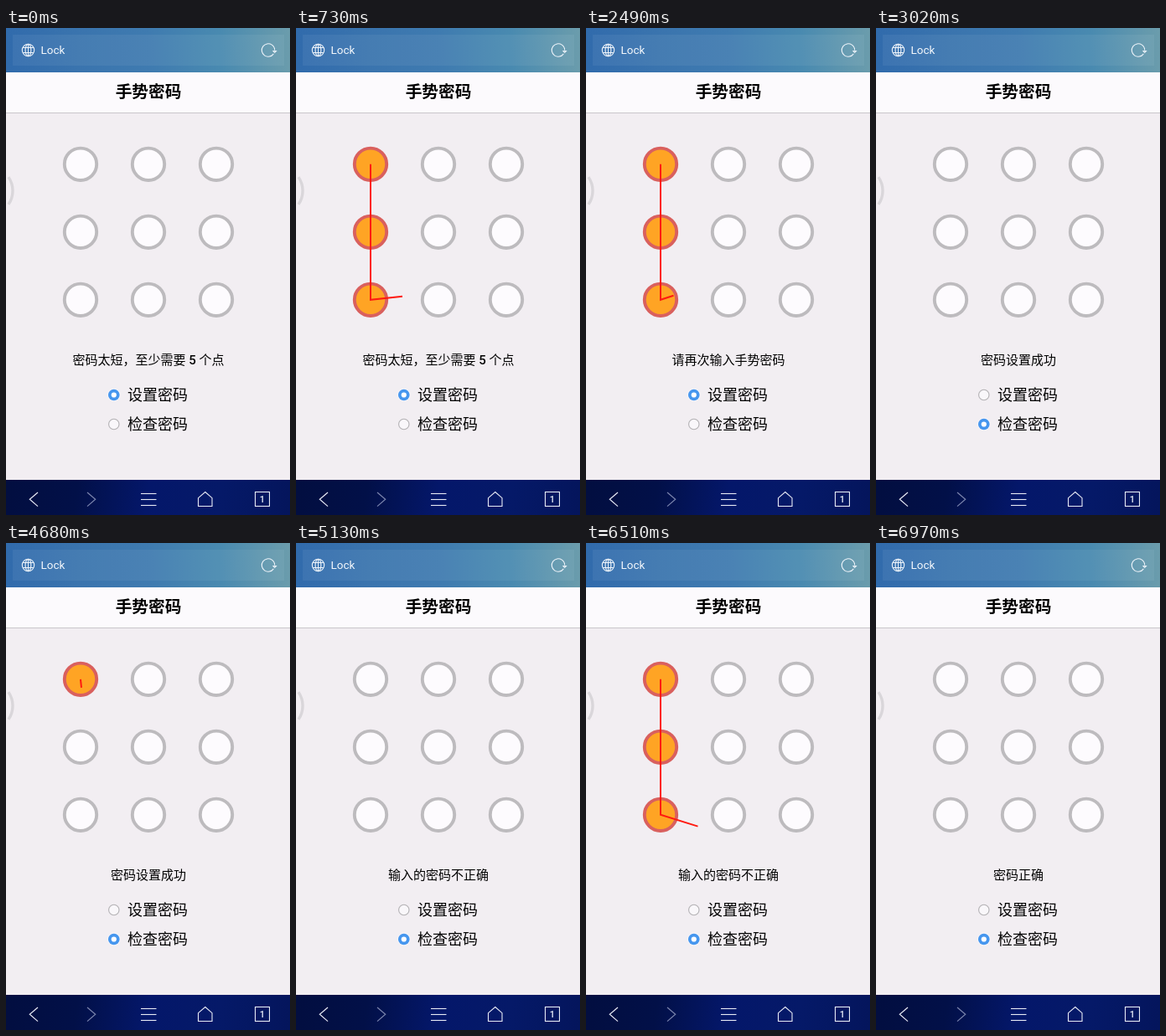
An HTML page with a canvas for the animation above (8 s loop, 339 by 582 pixels).

```html
<!DOCTYPE html>
<html lang="zh-CN">
<head>
<meta charset="utf-8">
<title>手势密码</title>
<style>
  html, body { margin: 0; width: 100%; height: 100%; overflow: hidden; background: #f2eef2; }
  canvas { display: block; }
</style>
</head>
<body>
<canvas id="stage" width="339" height="582"></canvas>
<script>
const ctx = document.getElementById('stage').getContext('2d');
const W = 339, H = 582, LOOP = 8000;
const CJK = '"Noto Sans CJK SC", "Noto Sans CJK", sans-serif';
const LATIN = 'Roboto, sans-serif';
const { PI, sin, cos, floor, min } = Math;

// Dot grid
const LEFT = 89, TOP = 162.8, GAP = 81, REACH = 30;
const CORNER = 2 * GAP;

const linear = v => v;
const easeOut = v => sin(v * PI / 2);
const easeInOut = v => (1 - cos(v * PI)) / 2;

// Every swipe runs down the left column, then right along the bottom row.
// near and far bound the rightward leg; drift is the finger's offset from the row.
const swipes = [
  { start: 460, end: 1120, steps: 5, near: 38, far: 188, ease: linear, drift: () => -4,
    reply: '请再次输入手势密码' },
  { start: 2240, end: 3020, steps: 6, near: 15.5, far: 175, ease: easeOut, drift: () => -5,
    reply: '密码设置成功' },
  { start: 4680, end: 5130, steps: 3, near: 3, far: 3, ease: linear, drift: () => 4,
    reply: '输入的密码不正确' },
  { start: 6100, end: 6970, steps: 6, near: 0, far: 178, ease: easeInOut,
    drift: v => 24 * sin(2 * PI * v) * (1 - v), reply: '密码正确' }
];

function fingerAt(swipe, t) {
  const { start, end, steps, near, far, ease, drift } = swipe;
  // The touch is seen in steps; the small lead makes each one land a little early.
  const step = min(steps - 1, floor((t - start) / (end - start) * steps + 0.18));
  if (step < 2) {
    const down = 10 + 112 * step;
    return { x: LEFT + 1, y: TOP + down, travelled: down };
  }
  const v = (step - 2) / Math.max(1, steps - 3);
  const right = near + (far - near) * ease(v);
  return { x: LEFT + right, y: TOP + CORNER + drift(v), travelled: CORNER + right };
}

function stroke(points, color, width = 1, close = false) {
  ctx.beginPath();
  points.forEach(([x, y]) => ctx.lineTo(x, y));
  if (close) ctx.closePath();
  ctx.strokeStyle = color;
  ctx.lineWidth = width;
  ctx.stroke();
}

function arc(x, y, r, from, to, color, width) {
  ctx.beginPath();
  ctx.arc(x, y, r, from, to);
  ctx.strokeStyle = color;
  ctx.lineWidth = width;
  ctx.stroke();
}

function circle(x, y, r, fill, line, width) {
  ctx.beginPath();
  ctx.arc(x, y, r, 0, 2 * PI);
  ctx.fillStyle = fill;
  ctx.fill();
  if (line) arc(x, y, r, 0, 2 * PI, line, width);
}

function text(str, x, y, font, color = '#000', align = 'left') {
  ctx.font = font;
  ctx.textAlign = align;
  ctx.fillStyle = color;
  ctx.fillText(str, x, y);
}

function gradientBand(y, height, slope, colors) {
  const g = ctx.createLinearGradient(0, y, W, y + slope);
  colors.forEach((c, i) => g.addColorStop(i / (colors.length - 1), c));
  ctx.fillStyle = g;
  ctx.fillRect(0, y, W, height);
}

function drawAddressBar() {
  gradientBand(0, 53, -20, ['#316bac', '#3a74ae', '#3f7bb0', '#498ab0', '#6c9dac']);
  ctx.fillStyle = 'rgba(255,255,255,.055)';
  ctx.fillRect(8, 8, 324, 37);

  const white = '#eef4fa';
  const cx = 26.5, cy = 26.5, r = 7.2;
  arc(cx, cy, r, 0, 2 * PI, white, 1.1);
  ctx.beginPath();
  ctx.ellipse(cx, cy, 3.4, r, 0, 0, 2 * PI);
  ctx.stroke();
  stroke([[cx, cy - r], [cx, cy + r]], white);
  for (const dy of [-3, 3]) stroke([[cx - 6.4, cy + dy], [cx + 6.4, cy + dy]], white);
  text('Lock', 41.5, 31, '13.5px ' + LATIN, '#f4f8fc');

  arc(313, cy, 7.7, 0.6, 2 * PI, white, 1.1);
  stroke([[319, 27.5], [322.5, 27.5], [320.7, 29.5]], white, 1.1, true);
}

function drawTitle() {
  ctx.fillStyle = '#fcfafd';
  ctx.fillRect(0, 53, W, 48);
  ctx.fillStyle = '#c8c6ca';
  ctx.fillRect(0, 101, W, 1);
  text('手势密码', W / 2 + 0.5, 83, 'bold 19.7px ' + CJK, '#000', 'center');
}

function drawToolbar() {
  const top = 540, mid = 563.3, white = '#e8ebf5';
  gradientBand(top, H - top, 42, ['#020e40', '#021048', '#04176a', '#051968', '#04155c']);
  const chevron = (x, dx, color) =>
    stroke([[x, mid - 8.3], [x + dx, mid], [x, mid + 8.3]], color, 1.2);
  chevron(38, -9.7, white);
  chevron(97, 9.7, '#7c86ae');
  for (const dy of [-7, 0, 7]) stroke([[161, 563.5 + dy], [179.5, 563.5 + dy]], white, 1.1);
  stroke([[237.8, 554.5], [246, 561.7], [246, 571.5], [229.5, 571.5], [229.5, 561.7]], white, 1.1, true);
  ctx.strokeRect(297.5, 554.5, 17, 17);
  text('1', 306, 567, '500 11px ' + LATIN, white, 'center');
}

function drawRadio(y, label, on) {
  const x = 128.8;
  if (on) {
    circle(x, y, 7.8, '#f8f6fa');
    circle(x, y, 6.8, '#4696ee');
    circle(x, y, 3.1, '#fff');
  } else {
    circle(x, y, 6.2, '#f9f7fa', '#b3b1b4', 1.1);
  }
  text(label, 145, y + 6.5, '18px ' + CJK);
}

function drawMessage(str) {
  const parts = str.split(/( \d )/).map(part => {
    const font = /\d/.test(part) ? '500 15px ' + LATIN : '15px ' + CJK;
    ctx.font = font;
    return { part, font, width: ctx.measureText(part).width };
  });
  let x = 170 - parts.reduce((sum, p) => sum + p.width, 0) / 2;
  for (const { part, font, width } of parts) {
    text(part, x, 402, font);
    x += width;
  }
}

function drawPad(finger) {
  const reached = finger ? min(4, floor((finger.travelled + REACH) / GAP)) : -1;
  const trail = [];
  for (let row = 0; row < 3; row++) {
    for (let col = 0; col < 3; col++) {
      const x = LEFT + GAP * col, y = TOP + GAP * row;
      const onPath = col === 0 || row === 2;
      const lit = onPath && row + col <= reached;
      if (lit) trail.push([x, y]);
      circle(x, y, 19.2, lit ? '#ffa424' : '#fdfbfe', lit ? '#d9605e' : '#bdbbbe', 3.9);
    }
  }
  if (finger) stroke([...trail, [finger.x, finger.y]], '#ff1a10', 2);
}

function draw(t) {
  const done = swipes.filter(s => t >= s.end);
  const swipe = swipes.find(s => t >= s.start && t < s.end);
  const message = done.length ? done[done.length - 1].reply : '密码太短，至少需要 5 个点';
  const checking = done.length >= 2;

  ctx.fillStyle = '#f2eef2';
  ctx.fillRect(0, 0, W, H);
  drawAddressBar();
  drawTitle();
  arc(-21, 194.5, 29, -0.6, 0.6, '#d9d6da', 3.4);
  drawPad(swipe && fingerAt(swipe, t));
  drawMessage(message);
  drawRadio(438.5, '设置密码', !checking);
  drawRadio(473.5, '检查密码', checking);
  drawToolbar();
}

const begin = performance.now();
function frame() {
  draw((performance.now() - begin) % LOOP);
  requestAnimationFrame(frame);
}
frame();
</script>
</body>
</html>
```
